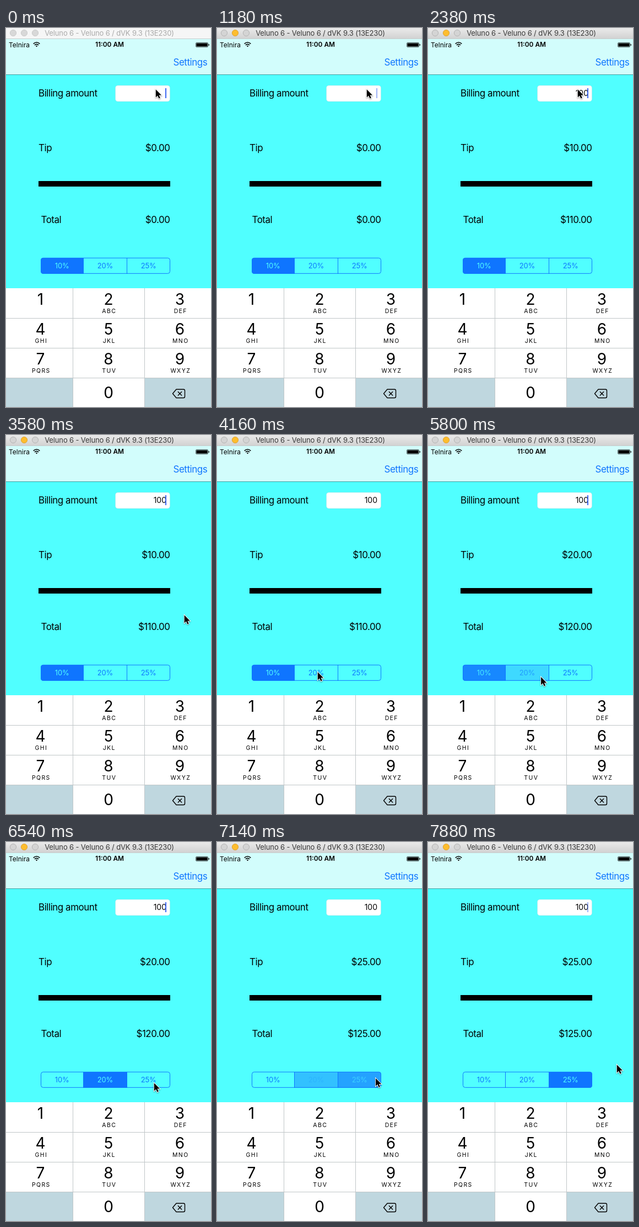
These frames come from a looping animation (372x686 px, 8000 ms). An HTML page:

```html
<!DOCTYPE html>
<html lang="en">
<head>
<meta charset="utf-8">
<title>Tip calculator</title>
<style>
  html, body { margin: 0; width: 100%; height: 100%; overflow: hidden; }
  svg { display: block; font-family: Inter, sans-serif; }
  .label { font-size: 16.9px; letter-spacing: -.025em; }
  .end { text-anchor: end; }
  .mid { text-anchor: middle; }
  .digit { font-size: 28px; }
  .letters { font-size: 10.5px; letter-spacing: 1.4px; }
  .option { font-size: 13px; letter-spacing: -.01em; }
  #title { font-size: 13px; letter-spacing: -.011em; }
  #cursor { filter: drop-shadow(0 1px 1px #0006); }
</style>
</head>
<body>
<svg width="372" height="686" viewBox="0 0 372 686">
  <defs>
    <linearGradient id="chrome" x2="0" y2="1">
      <stop stop-color="#eaeaea"/><stop offset="1" stop-color="#d2d2d2"/>
    </linearGradient>
    <clipPath id="round"><rect x="63" y="416" width="235" height="29" rx="4.5"/></clipPath>
  </defs>
  <rect width="372" height="686" fill="#50ffff"/>

  <rect id="bar" width="372" height="19"/>
  <g id="dots"></g>
  <text id="title" class="mid" x="187.5" y="14">Veluno 6 - Veluno 6 / dVK 9.3 (13E230)</text>

  <rect y="19" width="372" height="1" fill="#c6cfcf"/>
  <rect y="20" width="372" height="64" fill="#d2fdfc"/>
  <rect y="84" width="372" height="1" fill="#429fa1"/>
  <text x="5" y="34.5" font-size="12">Telnira</text>
  <g fill="none" stroke="#000" stroke-width="1.6">
    <path d="M49.7 28.6Q55.5 23.4 61.3 28.6M51.9 30.9Q55.5 27.8 59.1 30.9"/>
    <path d="M53.7 32.4Q55.5 31 57.3 32.4L55.5 34.3Z" fill="#000" stroke="none"/>
  </g>
  <text class="mid" x="188" y="34.3" font-size="11.9" font-weight="600">11:00 AM</text>
  <rect x="344.5" y="26.5" width="22" height="8" rx="1.5" fill="none" stroke="#000" stroke-width=".6"/>
  <rect x="345.4" y="27.4" width="20.2" height="6.2" rx=".6"/>
  <rect x="367.5" y="29" width="1.3" height="3" rx=".6"/>
  <text class="label end" x="365.2" y="68" fill="#0f75ff">Settings</text>

  <text class="label" x="59" y="124">Billing amount</text>
  <rect x="198.5" y="104" width="99" height="29" rx="4.5" fill="#fff" stroke="#a9dfe1" stroke-width=".5"/>
  <text id="bill" class="end" x="291" y="123" font-size="14"></text>
  <rect id="caret" x="289" y="109" width="2" height="18" fill="#3f69f2"/>
  <text class="label" x="59" y="222.5">Tip</text>
  <text id="tip" class="label end" x="297.5" y="222.5"></text>
  <rect x="59" y="277" width="239" height="10"/>
  <text class="label" x="63.5" y="353">Total</text>
  <text id="total" class="label end" x="297.5" y="353"></text>

  <g id="fills" clip-path="url(#round)"></g>
  <path d="M140.5 416V445M219.5 416V445" stroke="#0f75ff"/>
  <rect x="63.5" y="416.3" width="234" height="28" rx="4" fill="none" stroke="#0f75ff"/>
  <g id="options"></g>

  <rect y="471" width="372" height="215" fill="#fff"/>
  <path d="M0 633H121.5V686H0ZM251.5 633H372V686H251.5Z" fill="#bfd7df"/>
  <path d="M0 525.5H372M0 579.5H372M0 633.5H372M121.5 471V686M251.5 471V686" stroke="#c0c6c8"/>
  <g id="keys"></g>
  <g fill="none" stroke="#000" stroke-width="1.4" stroke-linejoin="round" stroke-linecap="round">
    <path d="M309 654H322Q324.5 654 324.5 656.5V667Q324.5 669.5 322 669.5H309L302.5 661.8Z"/>
    <path d="M312.3 658.6L318.7 665M318.7 658.6L312.3 665"/>
  </g>

  <path id="cursor" d="M.8 1.2V15.4L4.1 12.4 6.5 17.6 8.8 16.6 6.5 11.6H11Z"
        stroke="#fff" stroke-width="1.8" paint-order="stroke"/>
</svg>
<script>
const LOOP = 8000, STEP = 148.7;   // the screen is sampled once per STEP ms
const BLUE = [15, 117, 255], CYAN = [80, 255, 255];
const ACTIVATE = 8, FIRST_KEY = 12, TAP_20 = 39, TAP_25 = 47;   // in steps
const $ = id => document.getElementById(id);
const mix = (a, b, k) => a + (b - a) * k;

function add(parent, tag, attrs, text = '') {
  const el = document.createElementNS('http://www.w3.org/2000/svg', tag);
  for (const name in attrs) el.setAttribute(name, attrs[name]);
  el.textContent = text;
  return $(parent).appendChild(el);
}

const dots = [13, 33, 53].map(cx => add('dots', 'circle', { cx, cy: 9, r: 5.6 }));

[' ABC DEF', 'GHI JKL MNO', 'PQRS TUV WXYZ'].forEach((row, r) =>
  row.split(' ').forEach((letters, c) => {
    const x = [62.5, 186, 315.5][c], y = 501 + r * 54;
    add('keys', 'text', { class: 'mid digit', x, y }, r * 3 + c + 1);
    add('keys', 'text', { class: 'mid letters', x: x + 1.3, y: y + 15 }, letters);
  }));
add('keys', 'text', { class: 'mid digit', x: 186, y: 670 }, 0);

const edges = [63, 140.5, 219.5, 298];
const segments = [10, 20, 25].map((rate, i) => ({
  fill: add('fills', 'rect', { x: edges[i], y: 416, width: edges[i + 1] - edges[i], height: 29, fill: `rgb(${BLUE})` }),
  text: add('options', 'text', { class: 'mid option', x: (edges[i] + edges[i + 1]) / 2, y: 434.5 }, rate + '%')
}));

// Pointer path: step, x, y
const path = [[22, 271, 110], [25, 341, 400], [28, 182, 428], [30, 168, 489], [33, 110, 513],
              [38, 182, 436], [41, 268, 439], [44, 268, 435], [47, 268, 435], [50, 342, 402]];

function pointerAt(n) {
  const i = path.findIndex(p => p[0] > n);
  if (i < 1) return path.at(i);
  const [a, b] = [path[i - 1], path[i]];
  const k = (n - a[0]) / (b[0] - a[0]), ease = k * k * (3 - 2 * k);
  return a.map((v, j) => mix(v, b[j], ease));
}

// The caret stays lit for four steps after a key, then blinks every 20/3 steps.
function caretAlpha(n, typed) {
  const idle = n - (typed ? FIRST_KEY + 2 * typed + 2 : 1.3) + .5;
  if (idle < 0) return 1;
  const phase = idle % (20 / 3);
  return phase < 1 || phase >= 2.7 && phase < 3.7 ? .5 : phase < 2.7 ? 0 : 1;
}

const fade = d => d < 0 ? 0 : Math.min(1, .27 + .4 * d);

function draw(t) {
  const n = Math.floor((t + 10) / STEP);
  const active = n >= ACTIVATE;
  $('bar').setAttribute('fill', active ? 'url(#chrome)' : '#f6f6f6');
  $('title').setAttribute('fill', active ? '#3a3a3a' : '#aaa');
  dots.forEach((dot, i) => {
    const lit = active && i === 1;
    dot.setAttribute('fill', lit ? '#fdbd2e' : active ? '#d4d4d4' : '#d8d8d8');
    dot.setAttribute('stroke', lit ? '#dea236' : active ? '#b4b4b4' : '#cacaca');
  });

  const typed = Math.max(0, Math.min(3, Math.floor((n - FIRST_KEY) / 2) + 1));
  const bill = '100'.slice(0, typed);
  const tip = bill * (n < TAP_20 ? 10 : n < TAP_25 ? 20 : 25) / 100;
  $('bill').textContent = bill;
  $('tip').textContent = '$' + tip.toFixed(2);
  $('total').textContent = '$' + (+bill + tip).toFixed(2);
  $('caret').setAttribute('opacity', caretAlpha(n, typed));

  // A tapped segment fills ahead of the old one fading out.
  const p = fade(n - TAP_20), q = fade(n - TAP_25);
  [1 - p ** 1.5, p - q ** 1.5, q].forEach((w, i) => {
    const alpha = Math.max(0, w);
    segments[i].fill.setAttribute('opacity', alpha);
    segments[i].text.setAttribute('fill', `rgb(${BLUE.map((b, k) => mix(b, CYAN[k], alpha))})`);
  });

  const [, x, y] = pointerAt(n);
  $('cursor').setAttribute('transform', `translate(${x} ${y})`);
}

function tick() {
  draw(performance.now() % LOOP);
  requestAnimationFrame(tick);
}
tick();
</script>
</body>
</html>
```
